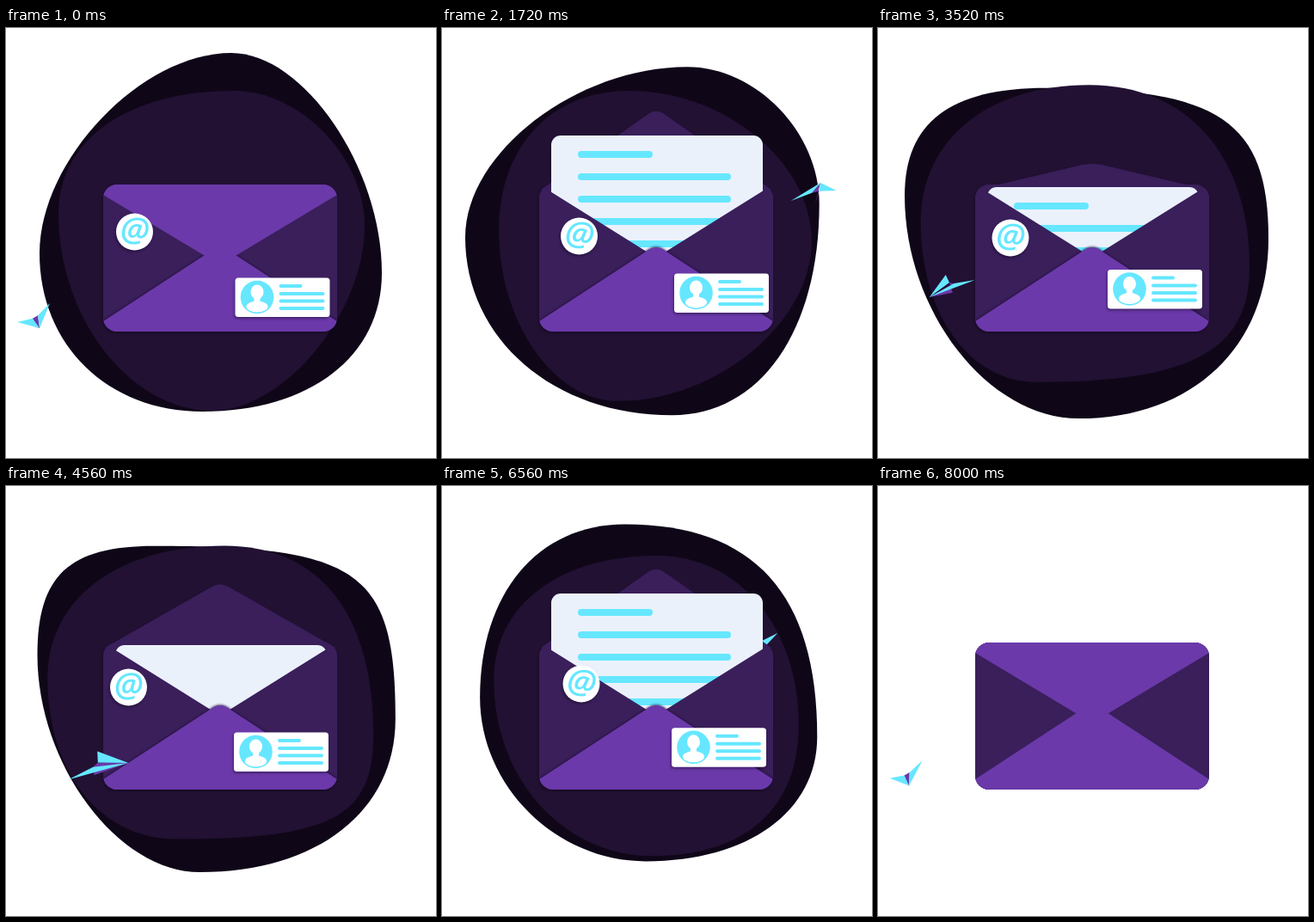
Animation, 500 px wide and 500 px high, one loop 8.04 s. Source, as an HTML page:

```html
<!DOCTYPE html>
<html lang="en">
<head>
<meta charset="utf-8">
<title>Envelope</title>
<style>
  html, body { margin: 0; width: 100%; height: 100%; overflow: hidden; background: #fff; }
  svg { display: block; width: 100%; height: 100%; }
  .dark { fill: #3a1f5b; }
  .purple { fill: #6b39aa; }
  .cyan { fill: #66e7ff; }
  .white { fill: #fff; }
  .rule { stroke: #66e7ff; stroke-linecap: round; }
  .shade { filter: drop-shadow(-1px 2px 1.5px rgba(10, 3, 20, .4)); }
  .edge { filter: drop-shadow(0 -1px 1px rgba(20, 8, 36, .6)); }
  #at { font: italic 600 39px "Open Sans", "Noto Sans", sans-serif; text-anchor: middle; }
</style>
</head>
<body>
<svg viewBox="0 0 500 500">
  <defs>
    <clipPath id="body"><rect x="113" y="182" width="272" height="171" rx="16"/></clipPath>
    <clipPath id="face"><circle cx="25.5" cy="22.5" r="18.5"/></clipPath>
  </defs>
  <path id="outer" fill="#0f0718"/>
  <path id="inner" fill="#221133"/>
  <g id="behind">
    <g id="plane">
      <polygon class="purple"/>
      <polygon class="cyan"/>
      <polygon class="cyan"/>
    </g>
  </g>
  <g id="envelope" class="shade">
    <path id="flapUp" class="dark"/>
    <rect class="dark" x="113" y="182" width="272" height="171" rx="16"/>
    <g id="letter">
      <rect x="127" y="125" width="246" height="155" rx="11" fill="#ebf1fb"/>
      <g id="rules" stroke-width="8"></g>
    </g>
    <g clip-path="url(#body)">
      <path class="dark" d="M113 182L249 267L385 182V353H113Z"/>
      <path id="pocket" class="purple edge" d="M113 341L237 260Q249 250 261 260L385 341V353H113Z"/>
      <path id="flapDown" class="purple" d="M113 182H385V194L255 272Q249 276 243 272L113 194Z"/>
    </g>
  </g>
  <g id="badge" class="shade">
    <circle class="white" r="21.5"/>
    <text id="at" class="cyan" y="11">@</text>
  </g>
  <g id="card" class="shade">
    <rect class="white" width="110" height="45.5" rx="3.5"/>
    <circle class="cyan" cx="25.5" cy="22.5" r="19.3"/>
    <g class="white" clip-path="url(#face)">
      <ellipse cx="25.5" cy="16.5" rx="7.5" ry="8.5"/>
      <rect x="22" y="22" width="7" height="8"/>
      <ellipse cx="25.5" cy="33.5" rx="12.5" ry="6.5"/>
    </g>
    <path class="rule" fill="none" stroke-width="4" d="M53 9.5H76M53 18.5H102M53 27H102M53 35.5H102"/>
  </g>
  <g id="front"></g>
</svg>
<script>
const LOOP = 8040, HALF = LOOP / 2;
const $ = id => document.getElementById(id);
const clamp = x => Math.max(0, Math.min(1, x));
const ease = x => (x = clamp(x), x < .5 ? 2 * x * x : 1 - 2 * (1 - x) * (1 - x));
const ramp = (t, from, length) => ease((t - from) / length);
const lerp = (a, b, u) => a + (b - a) * u;

// Smooth periodic curve through rows of values at uneven times
function track(times, period, rows) {
  const n = times.length;
  const time = i => times[(i + n) % n] + Math.floor(i / n) * period;
  const row = i => rows[(i + n) % n];
  return t => {
    let i = n - 1;
    while (times[i] > t) i--;
    const h = time(i + 1) - time(i), u = (t - time(i)) / h;
    const slope = (j, k) => (row(j + 1)[k] - row(j - 1)[k]) / (time(j + 1) - time(j - 1)) * h;
    return row(i).map((a, k) => {
      const b = row(i + 1)[k], m = slope(i, k), w = slope(i + 1, k);
      return a + u * (m + u * (3 * (b - a) - 2 * m - w + u * (2 * (a - b) + m + w)));
    });
  };
}

// Each key is the leftmost, top, rightmost and bottom point, a quarter loop apart.
// The fullness of each of the four arcs sways around a mean.
const outer = {
  keys: [
    [[39, 262], [262, 29], [437, 285], [228, 446]],
    [[25, 240], [289, 48], [439, 191], [274, 451]],
    [[33, 180], [164, 77], [459, 263], [220, 455]],
    [[46, 240], [195, 50], [436, 294], [240, 433]]
  ],
  mean: [.59, .655, .6, .545], sway: [.14, .2, 0, -.04]
};
const inner = {
  keys: [
    [[61, 215], [265, 73], [417, 230], [240, 445]],
    [[67, 238], [210, 73], [432, 251], [199, 432]],
    [[44, 221], [257, 64], [432, 287], [180, 405]],
    [[60, 229], [245, 84], [414, 295], [247, 425]]
  ],
  mean: [.6, .57, .62, .56], sway: [0, .07, .17, .03]
};

function blob({ keys, mean, sway }, t) {
  const q = t / LOOP * 4, i = Math.floor(q), next = keys[(i + 1) % 4];
  const pts = keys[i].map((p, j) => p.map((v, k) => lerp(v, next[j][k], q - i)));
  const wave = -Math.cos(t / LOOP * 2 * Math.PI - .5);
  const arcs = pts.map((a, j) => {
    const b = pts[(j + 1) % 4], full = mean[j] + sway[j] * wave;
    const corner = j % 2 ? [b[0], a[1]] : [a[0], b[1]];
    const handle = p => p.map((v, k) => lerp(v, corner[k], full));
    return "C" + [handle(a), handle(b), b].join(" ");
  });
  return "M" + pts[0] + arcs.join("") + "Z";
}

const beats = [0, 1720, 3520, 4560, 5320, 6560];
const badgeAt = track(beats, LOOP, [[149.5, 237], [159.5, 242], [154, 244], [142.5, 234], [141, 237], [162, 230]]);
const cardAt = track(beats, LOOP, [[266.5, 290.5], [270, 285.5], [267, 281], [265, 286.5], [270, 284.5], [267, 281.3]]);

// Nose, then the vector from tail to nose, then from right to left wing tip
const planeAt = track([0, 540, 1300, 1720, 2100, 2540, 3520], HALF, [
  [39, 349, 7, 18, 38, -22],
  [142, 322, 53, -3, 34, -33],
  [384, 219, 32, -25, -41, -16],
  [440, 180, 8, -15, -53, 12],
  [440, 160, -11, -18, -38, 24],
  [348, 192, -40, 6, -5, 30],
  [60, 313, -36, 23, 34, 6]
]);

const rules = [0, 1, 2, 3, 4].map(i => {
  const line = document.createElementNS("http://www.w3.org/2000/svg", "line");
  const y = 147 + 26 * i;
  line.setAttribute("class", "rule");
  line.setAttribute("x1", 162);
  line.setAttribute("y1", y);
  line.setAttribute("y2", y);
  return $("rules").appendChild(line);
});

const show = (el, on) => el.setAttribute("visibility", on ? "visible" : "hidden");

function drawEnvelope(p) {
  const open = 2 * (ramp(p, 190, 450) - ramp(p, 3325, 480)) - 1;
  const apex = 188 - 95 * open;
  const near = 188 + (apex - 188) * .93;
  show($("flapUp"), open > 0);
  show($("flapDown"), open < 0);
  $("flapUp").setAttribute("d", `M115 188L240 ${near}Q249 ${apex + 1} 258 ${near}L383 188Z`);
  $("flapDown").setAttribute("transform", `translate(0 182) scale(1 ${Math.max(0, -open)}) translate(0 -182)`);

  const lift = ramp(p, 650, 260) - ramp(p, 3000, 280);
  $("letter").setAttribute("transform", `translate(0 ${60 * (1 - lift)})`);
  rules.forEach((line, i) => {
    const done = p > 3780 ? 0 : clamp((p - 869 - 125 * i) / 125);
    line.setAttribute("x2", 162 + (i ? 170 : 79) * done);
    show(line, done > 0);
  });
}

function drawPlane(p) {
  const [x, y, ax, ay, sx, sy] = planeAt(p);
  const at = (back, side, drop = 0) => [x - back * ax + side * sx, y - back * ay + side * sy + drop];
  const nose = at(0, 0), rootL = at(.72, .08), rootR = at(.72, -.08);
  const shapes = [
    [nose, rootL, rootR, at(.75, 0, 12)],
    [nose, at(1, .5), rootL],
    [nose, at(1, -.5), rootR]
  ];
  const plane = $("plane");
  shapes.forEach((pts, i) => plane.children[i].setAttribute("points", pts.join(" ")));
  const layer = $(p > 2150 && p < 3600 ? "behind" : "front");
  if (plane.parentNode !== layer) layer.appendChild(plane);
}

function draw(t) {
  const p = t % HALF, full = t < 8000;
  for (const id of ["outer", "inner", "badge", "card"]) show($(id), full);
  $("envelope").classList.toggle("shade", full);
  $("pocket").classList.toggle("edge", full);

  $("outer").setAttribute("d", blob(outer, t));
  $("inner").setAttribute("d", blob(inner, t));
  drawEnvelope(p);
  drawPlane(p);

  const [bx, by] = badgeAt(t);
  $("badge").setAttribute("transform", `translate(${bx} ${by})`);
  $("at").setAttribute("transform", `rotate(${(bx - 142) * .5})`);
  $("card").setAttribute("transform", `translate(${cardAt(t)})`);
}

const start = performance.now();
function tick() {
  draw((performance.now() - start) % LOOP);
  requestAnimationFrame(tick);
}
tick();
</script>
</body>
</html>
```
